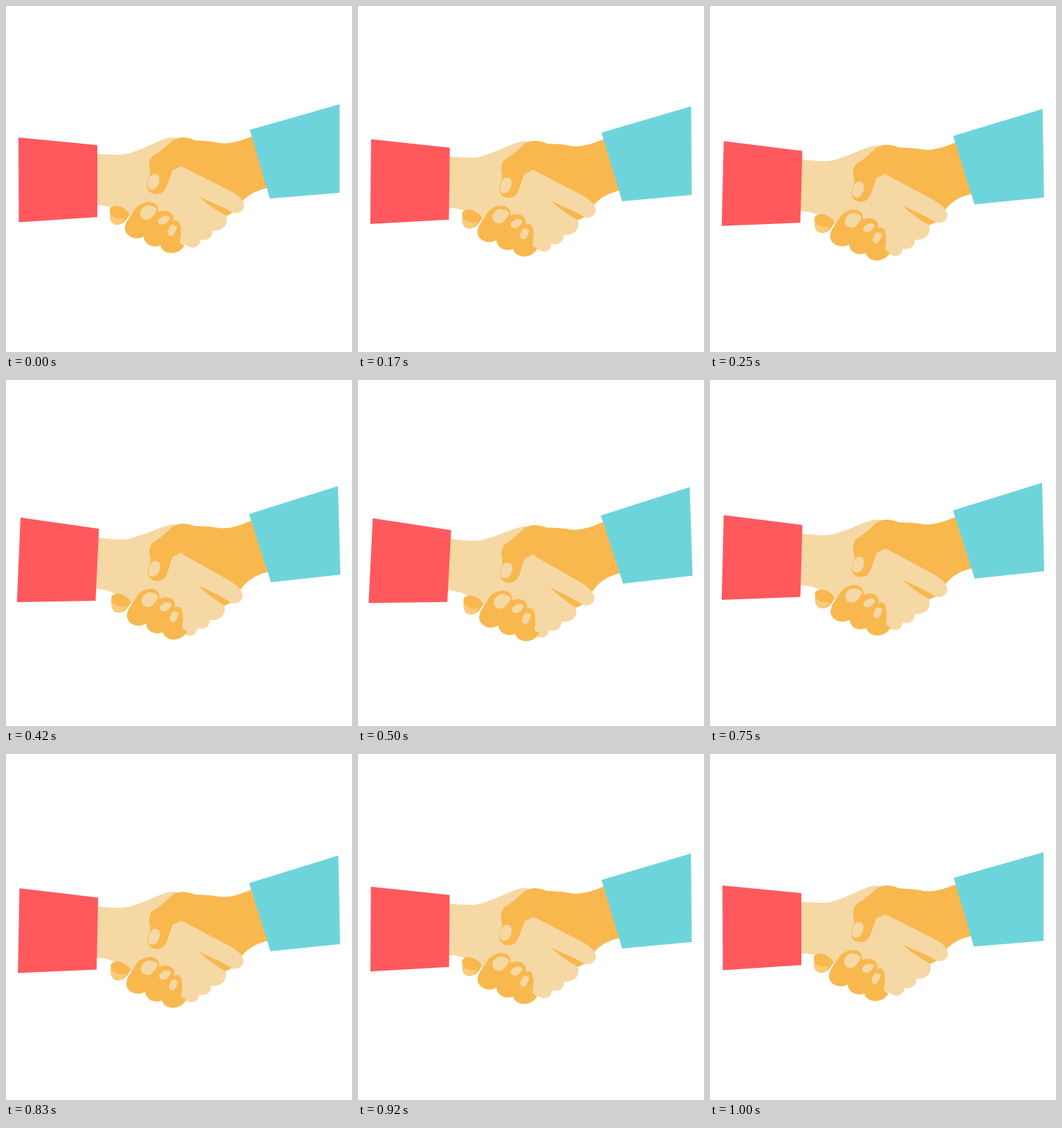
Recreate the animation shown at these times as an HTML page. Size 500 by 500 pixels, loop 1.04 s.

```html
<!DOCTYPE html>
<html lang="en">
<head>
<meta charset="utf-8">
<title>Handshake</title>
<style>
  html, body { margin: 0; width: 100%; height: 100%; overflow: hidden; background: #fff; }
  svg { display: block; width: 100%; height: 100%; }
  .light { fill: #f6d8a5; }
  .orange { fill: #f8b84e; }
  .red { fill: #ff595e; }
  .blue { fill: #6ed4dc; }
  .tip { fill: #fbcb77; }
</style>
</head>
<body>
<svg viewBox="0 0 500 500">
  <!-- left arm and back of the hand -->
  <g class="left light">
    <path d="M130 214C156 214 167 218 186 210C207 203 226 191 239 190Q247 190 254 196L264 230L268 346L250 340L200 320L178 305C162 294 152 288 130 288Z"/>
    <path class="red" d="M18 190L132 201V305L18.5 312.5Z"/>
  </g>

  <!-- right arm and thumb -->
  <g class="right orange">
    <path d="M384 262C358 266 347 276 340 284C334 291 328 299 319 303L300 292L262 262L255 232Q250 232 247 235L241 237C238 243 236 250 233 258C230 267 225 272 217 272C209 271 203 267 204 257C206 250 208 246 208 239C206 229 206 222 213 216C225 209 232 202 240 195C249 188 261 189 273 194C285 195 297 195 309 198C322 200 339 195 354 189L384 186Z"/>
    <path class="light" d="M208 247C211 242 218 241 221 246C223 252 221 259 217 263C212 267 206 266 205 261C205 255 206 250 208 247Z"/>
    <path class="blue" d="M352.3 179L482 142V270L381.3 278.3Z"/>
  </g>

  <!-- left fingers, with the gap below the index finger -->
  <g class="left light">
    <path class="orange" d="M276 274L300 280L329 298L317 304L300 294Z"/>
    <path d="M256 233L310 260C328 269 341 275 344 287C345 296 336 301 328 299C316 291 295 283 277 275C289 285 303 295 318 303C321 311 319 325 298 325C299 333 293 340 281 338C280 346 275 350 267 349Q258 345 251 341L242 300L243 239Z"/>
  </g>

  <!-- right fingers -->
  <g class="right orange">
    <path d="M150 293C154 287 163 288 168 291Q177 296 178 301C175 310 168 316 160 316C152 315 150 309 150 301Z"/>
    <path class="tip" d="M150 298C153 305 161 309 172 307C168 313 164 316 159 316C153 315 150 311 150 303Z"/>
    <path d="M172.5 317C174 309 181 304 185.5 295C190 287 200 283 208 283C216 284 221 289 220 298C226 294 238 295 241 303Q243 307 241 312C246 307 251 311 252 317C254 327 252 335 251 341L258 346C254 353 247 357 239 357C231 357 225 353 223 346C214 350 200 346 199 333C192 338 180 336 174.5 329Q170.5 324 172.5 317Z"/>
    <g class="light">
      <path d="M194 297Q198 288 206 288Q218 290 218 295Q212 307 205 309Q192 309 194 297Z"/>
      <path d="M220 309Q225 303 231 303Q237 304 237 307Q232 315 227 316Q218 316 220 309Z"/>
      <path d="M233.5 326Q237 316 240.5 316L247 319Q245 327 240.5 332Q233 333 233.5 326Z"/>
    </g>
  </g>
</svg>
<script>
  const LOOP = 1040, TICKS_PER_SEC = 24;
  // [pose, share of the full downward swing]
  const keys = [[0, 0], [1, .04], [3, .24], [5, .52], [8, .87], [10, .985], [11, 1],
                [12, .96], [13, .87], [15, .53], [18, .165], [19, .06], [20, 0]];
  const left = document.querySelectorAll('.left');
  const right = document.querySelectorAll('.right');

  function swing(pose) {
    const k = Math.max(1, keys.findIndex(([at]) => at >= pose));
    const [a, from] = keys[k - 1], [b, to] = keys[k];
    return from + (to - from) * (pose - a) / (b - a);
  }

  function turn(parts, transform) {
    parts.forEach(part => part.setAttribute('transform', transform));
  }

  function draw() {
    const time = performance.now() % LOOP;
    // 20 poses a second, shown on a 24 per second clock
    const tick = Math.floor((time + 4.9) * TICKS_PER_SEC / 1000);
    const pose = Math.min(20, Math.floor(tick * 5 / 6));
    const down = swing(pose);
    const lag = pose > 10 ? Math.sin(Math.PI * (pose - 10) / 10) : 0;
    turn(left, `rotate(${3.1 * down} -165 258)`);
    turn(right, `rotate(${-.4 * lag} 420 240) rotate(${-1.85 * down} 880 230)`);
    requestAnimationFrame(draw);
  }
  draw();
</script>
</body>
</html>
```
